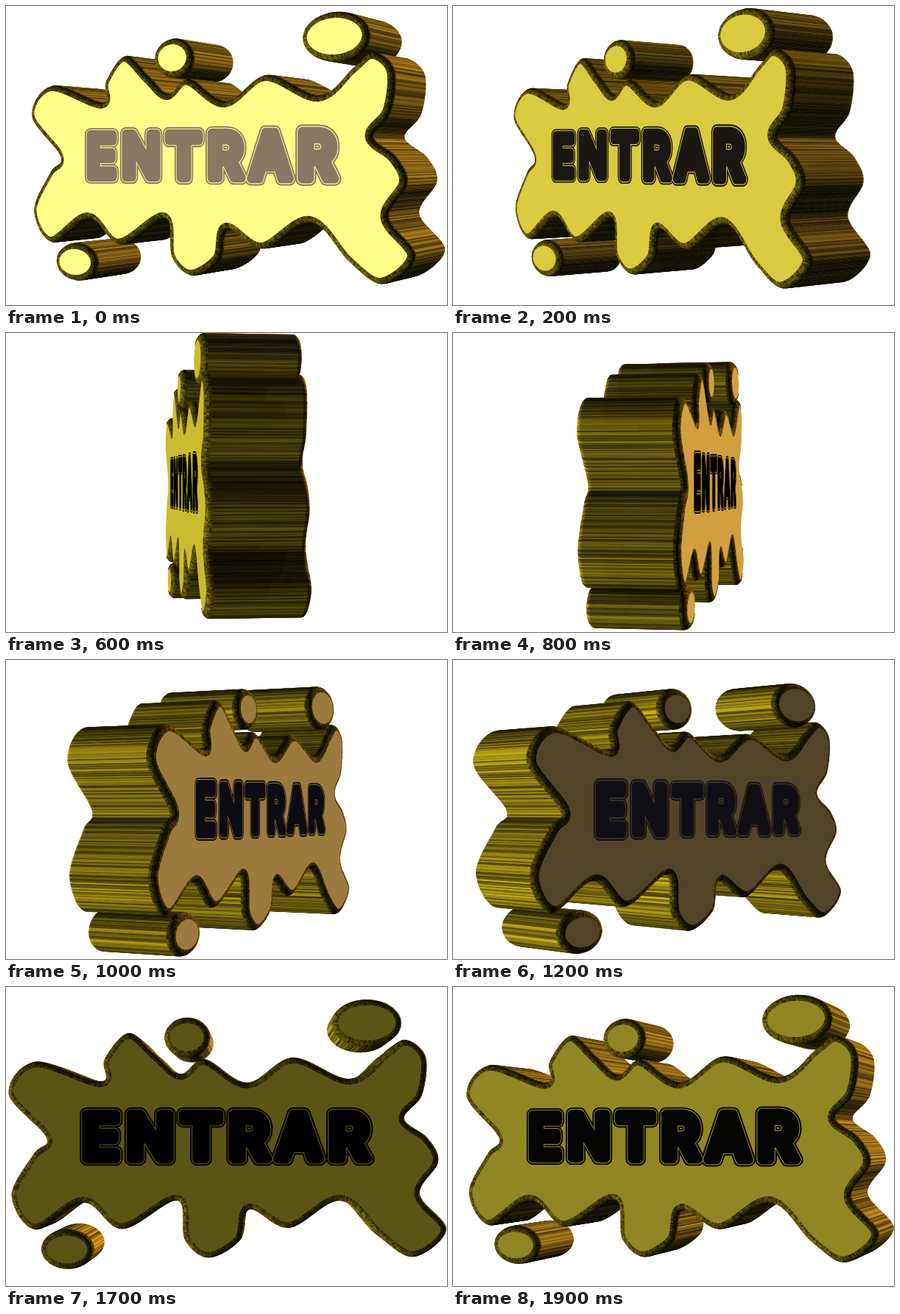
An HTML page with a canvas that plays this animation: 599x407 px, repeating every 2000 ms.

```html
<!DOCTYPE html>
<html lang="es">
<head>
<meta charset="utf-8">
<title>Entrar</title>
<style>
html, body { margin: 0; width: 100%; height: 100%; overflow: hidden; background: #fff; }
canvas { display: block; }
</style>
</head>
<body>
<canvas id="stage" width="599" height="407" role="img" aria-label="ENTRAR"></canvas>
<script>
const ctx = document.getElementById('stage').getContext('2d');
const LOOP = 2000, STEP = 100;
const CENTER = { x: 299.5, y: 203.5 }, CAMERA = 1700, HALF = 60;
const FIT = 0.964, ORIGIN = { x: 298, y: 203.5 };

// Tips and valleys of the splat, clockwise
const OUTLINE = [
  [1,145],[38,101],[128,128],[133,97],[166,62],[205,93],[237,118],[270,98],[328,130],[390,96],
  [467,125],[515,90],[543,72],[570,95],[565,147],[541,179],[573,206],[587,238],[562,282],[598,330],
  [555,367],[510,342],[455,291],[385,328],[331,303],[318,345],[275,369],[243,345],[232,291],
  [157,330],[104,294],[38,331],[5,285],[35,228],[53,205]
];
const BLOBS = [
  { x: 246, y: 68, rx: 31, ry: 27 },
  { x: 490, y: 49, rx: 47, ry: 32 },
  { x: 82, y: 358, rx: 36, ry: 27 }
];

const LIGHTS = [
  { dir: [-0.94, 0.2, 0.34], rgb: [181, 168, 41] },
  { dir: [0.82, -0.38, -0.57], rgb: [262, 192, 82] }
];
const AMBIENT = [25, 24, 6];
const WALL_TINT = [1, 0.93, 0.4];
const SHINES = [
  { at: 35, width: 7.5, rgb: [286, 254, 212] },
  { at: -52, width: 9, rgb: [41, 37, 54] }
];

const css = c => `rgb(${c.map(v => Math.max(0, Math.min(255, Math.round(v)))).join()})`;
const noise = (a, b) => {
  const v = Math.sin(a * 127.1 + b * 311.7) * 43758.5453;
  return v - Math.floor(v);
};

// Quarter-round edge, from the wall (0) to the flat side (1)
const roundEdge = (radius, t) => {
  const a = t * Math.PI / 2;
  return { inset: radius * (1 - Math.cos(a)), z: HALF - radius * (1 - Math.sin(a)) };
};
const EDGE_STEPS = 4;
const PROFILE = [];
for (let i = EDGE_STEPS; i >= 0; i--) {
  const { inset, z } = roundEdge(5, i / EDGE_STEPS);
  PROFILE.push({ inset, z: -z });
}
for (let i = 0; i <= EDGE_STEPS; i++) PROFILE.push(roundEdge(8, i / EDGE_STEPS));

function spline(points) {
  const out = [], n = points.length;
  points.forEach((b, i) => {
    const a = points[(i + n - 1) % n], c = points[(i + 1) % n], d = points[(i + 2) % n];
    const count = Math.ceil(Math.hypot(c[0] - b[0], c[1] - b[1]) / 1.6);
    for (let k = 0; k < count; k++) {
      const t = k / count;
      out.push([0, 1].map(j => b[j] + 0.5 * t * (c[j] - a[j] +
        t * (2 * a[j] - 5 * b[j] + 4 * c[j] - d[j] + t * (3 * (b[j] - c[j]) + d[j] - a[j])))));
    }
  });
  return out;
}

function ellipse({ x, y, rx, ry }) {
  const count = Math.ceil(Math.PI * (rx + ry) / 1.6);
  return Array.from({ length: count }, (_, i) => {
    const a = i / count * 2 * Math.PI;
    return [x + rx * Math.cos(a), y + ry * Math.sin(a)];
  });
}

function withNormals(points) {
  const n = points.length;
  return points.map((p, i) => {
    const a = points[(i + n - 2) % n], b = points[(i + 2) % n];
    const dx = b[0] - a[0], dy = b[1] - a[1], len = Math.hypot(dx, dy);
    return {
      x: (p[0] - ORIGIN.x) * FIT, y: (p[1] - ORIGIN.y) * FIT,
      nx: dy / len, ny: -dx / len
    };
  });
}

const shapes = [spline(OUTLINE), ...BLOBS.map(ellipse)].map(withNormals);
const strips = shapes.flatMap(s => s.map((p, i) => ({ p, q: s[(i + 1) % s.length] })));
strips.forEach((s, i) => { s.id = i; });

function makeView(degrees) {
  const a = degrees * Math.PI / 180, cos = Math.cos(a), sin = Math.sin(a);
  const turn = (x, y, z) => [x * cos - z * sin, y, x * sin + z * cos];
  const project = (x, y, z) => {
    const w = turn(x, y, z), k = CAMERA / (CAMERA - w[2]);
    return [CENTER.x + w[0] * k, CENTER.y + w[1] * k, k];
  };
  const onEdge = (p, { inset, z }) => project(p.x - p.nx * inset, p.y - p.ny * inset, z);
  return { sin, turn, project, onEdge };
}

function shade(normal) {
  return AMBIENT.map((base, c) => LIGHTS.reduce((sum, l) =>
    sum + l.rgb[c] * Math.max(0, normal.reduce((d, v, i) => d + v * l.dir[i], 0)), base));
}

function shine(degrees) {
  return [0, 1, 2].map(c => SHINES.reduce((sum, s) =>
    sum + s.rgb[c] * Math.exp(-(((degrees - s.at) / s.width) ** 2)), 0));
}

function tracePath(points) {
  ctx.beginPath();
  points.forEach(p => ctx.lineTo(p[0], p[1]));
  ctx.closePath();
}

function drawStrip(view, { p, q, id }) {
  for (let b = 0; b < PROFILE.length - 1; b++) {
    const lo = PROFILE[b], hi = PROFILE[b + 1];
    const out = hi.z - lo.z, fwd = hi.inset - lo.inset, len = Math.hypot(out, fwd);
    const normal = view.turn(p.nx * out / len, p.ny * out / len, fwd / len);
    const pos = view.turn(p.x, p.y, lo.z);
    const facing = normal[2] * (CAMERA - pos[2]) - normal[0] * pos[0] - normal[1] * pos[1];
    if (facing <= 0) continue;
    const gain = b <= EDGE_STEPS ? 0.35 + 0.75 * noise(id, 1) : 0.25 + 0.5 * noise(id, b);
    const color = css(shade(normal).map((v, c) => v * gain * WALL_TINT[c]));
    tracePath([view.onEdge(p, lo), view.onEdge(q, lo), view.onEdge(q, hi), view.onEdge(p, hi)]);
    ctx.fillStyle = ctx.strokeStyle = color;
    ctx.lineWidth = 0.7;
    ctx.fill();
    ctx.stroke();
  }
}

function drawWord(view, ink, line) {
  const letters = [...'ENTRAR'], gap = 9.5, baseline = 29.5;
  ctx.font = '600 81px Inter, sans-serif';
  ctx.textAlign = 'center';
  ctx.lineJoin = 'round';
  const widths = letters.map(ch => ctx.measureText(ch).width);
  const total = widths.reduce((a, b) => a + b, gap * (letters.length - 1));
  for (const [width, color] of [[18, ink], [14.2, line], [12, ink]]) {
    let left = -total / 2;
    ctx.fillStyle = ctx.strokeStyle = color;
    ctx.lineWidth = width;
    letters.forEach((ch, i) => {
      const x = left + widths[i] / 2;
      const o = view.project(x, 0, HALF), e = view.project(x + 1, 0, HALF);
      ctx.setTransform(e[0] - o[0], 0, 0, o[2], o[0], o[1]);
      ctx.strokeText(ch, 0, baseline);
      ctx.fillText(ch, 0, baseline);
      left += widths[i] + gap;
    });
  }
  ctx.setTransform(1, 0, 0, 1, 0, 0);
}

function draw(time) {
  // Half a turn per loop; past edge-on the same face comes round again
  let degrees = 1.5 + (time - 1700) * 180 / LOOP;
  if (degrees < -90) degrees += 180;
  const view = makeView(degrees);
  ctx.fillStyle = '#fff';
  ctx.fillRect(0, 0, 599, 407);

  const side = Math.sign(view.sin);
  strips.sort((a, b) => (a.p.x - b.p.x) * side);
  strips.forEach(s => drawStrip(view, s));

  const gloss = shine(degrees);
  const face = css(shade(view.turn(0, 0, 1)).map((v, i) => v + gloss[i]));
  const rim = PROFILE[PROFILE.length - 1];
  ctx.fillStyle = face;
  shapes.forEach(s => {
    tracePath(s.map(p => view.onEdge(p, rim)));
    ctx.fill();
  });
  drawWord(view, css(gloss), face);
}

let shown = -1;
const start = performance.now();
function tick() {
  const time = Math.floor((performance.now() - start) % LOOP / STEP) * STEP;
  if (time !== shown) draw(shown = time);
  requestAnimationFrame(tick);
}
tick();
</script>
</body>
</html>
```
